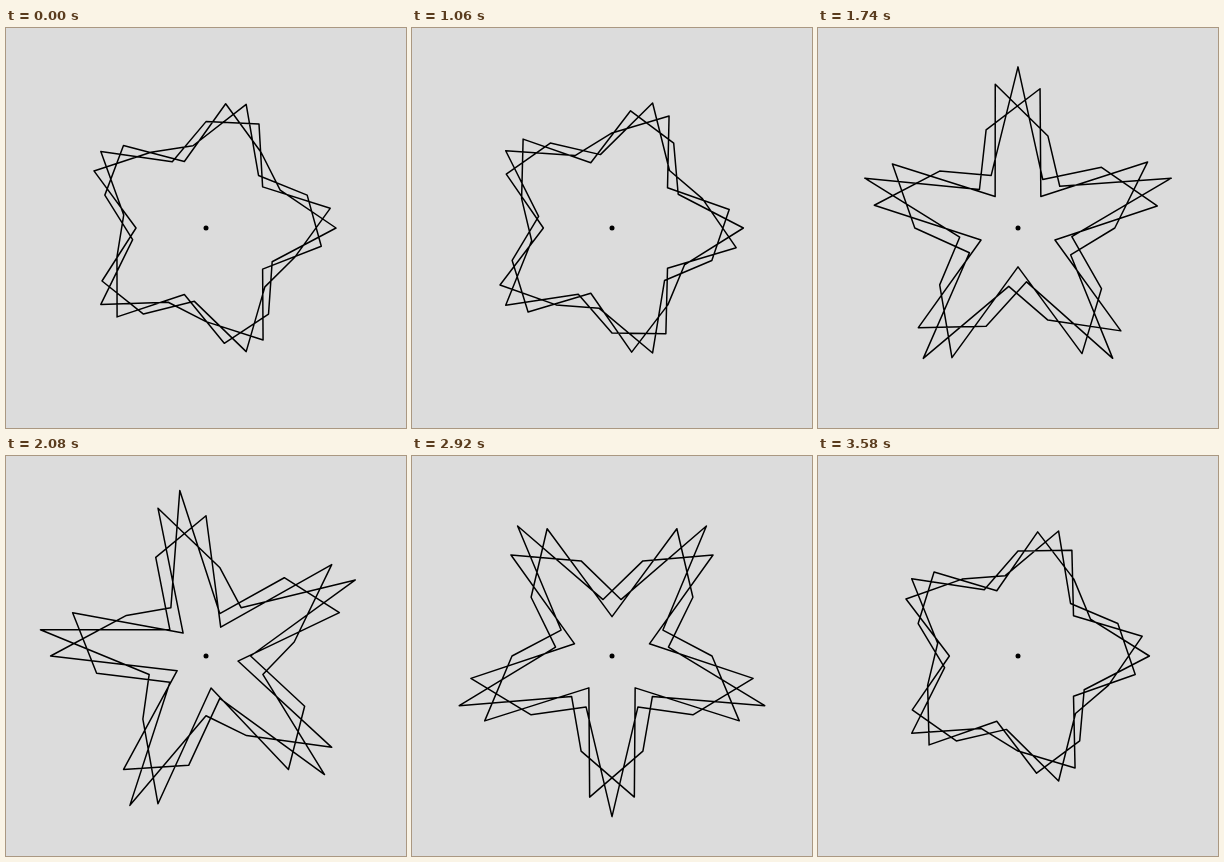
Write an HTML page that moves like this. It is 400 px wide and 400 px high and loops after 3.6 s.

```html
<!DOCTYPE html>
<html lang="en">
<head>
<meta charset="utf-8">
<title>Rotating star wave</title>
<style>
  html, body { margin: 0; width: 100%; height: 100%; overflow: hidden; background: #dcdcdc; }
  svg { display: block; width: 100%; height: 100%; }
</style>
</head>
<body>
<svg viewBox="0 0 400 400">
  <rect width="400" height="400" fill="#dcdcdc"/>
  <polygon id="star" fill="none" stroke="#000" stroke-width="1.5" stroke-linejoin="round"/>
  <circle cx="200" cy="200" r="2.5"/>
</svg>
<script>
  const LOOP = 3600, STEP = 20, PEAK = 2320;
  const POINTS = 40, TURNS = 3, LOBES = 5;
  const RADIUS = 100, SWING = 35, CENTER = 200;
  const TAU = Math.PI * 2;
  const star = document.getElementById('star');

  // Two waves, one twice as fast as the other, ride on a circle
  // that is sampled over three turns.
  function draw(ms) {
    const time = Math.floor((ms % LOOP) / STEP) * STEP;
    const phase = (time - PEAK) / LOOP * TAU;
    const points = [];
    for (let i = 0; i < POINTS; i++) {
      const angle = i * TURNS / POINTS * TAU;
      const wave = Math.cos(LOBES * angle + phase) + Math.cos(LOBES * angle + 2 * phase);
      const r = RADIUS + SWING * wave;
      const x = CENTER - r * Math.cos(angle);
      const y = CENTER - r * Math.sin(angle);
      points.push(x.toFixed(2) + ',' + y.toFixed(2));
    }
    star.setAttribute('points', points.join(' '));
  }

  const start = performance.now();
  function tick() {
    draw(performance.now() - start);
    requestAnimationFrame(tick);
  }
  tick();
</script>
</body>
</html>
```
